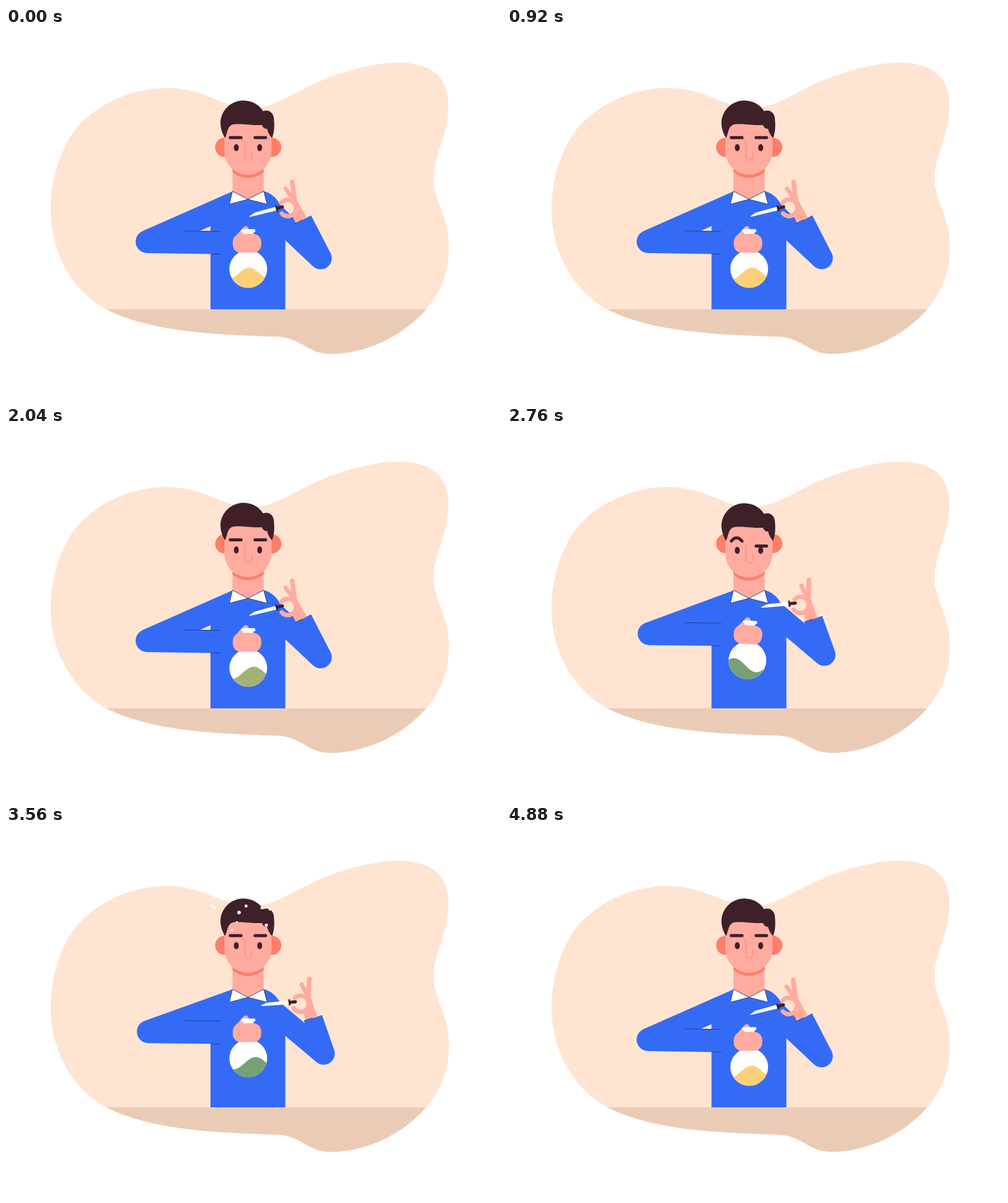
Animation of 800 by 600 pixels, one loop 4920 ms. Source, as an HTML page with a canvas:

```html
<!DOCTYPE html>
<html lang="en">
<head>
<meta charset="utf-8">
<title>Chemist with flask</title>
<style>
html, body { margin: 0; width: 100%; height: 100%; overflow: hidden; background: #fff; }
canvas { display: block; width: 800px; height: 600px; }
</style>
</head>
<body>
<canvas id="stage" width="800" height="600"></canvas>
<script>
const ctx = document.getElementById('stage').getContext('2d');
const LOOP = 4920;
const PEACH = '#ffe4d2', TABLE = '#eaccb6', BLUE = '#346bf6', SEAM = '#1d3d96';
const SKIN = '#ffaba0', BLUSH = '#ff7e69', DARK = '#3f2028', WHITE = '#fff';
const YELLOW = [252, 208, 120], GREEN = [120, 160, 117];

const blob = new Path2D('M72 294C72 250 85 205 107 171C139 126 200 97 260 97C322 97 352 130 394 130C435 130 472 100 512 84C550 69 596 56 634 56C684 56 715 76 715 125C715 175 691 205 691 243C691 280 716 305 716 355C716 396 701 430 679 455C640 500 580 527 525 527C485 527 478 499 434 499C340 496 235 492 162 455C105 424 72 360 72 294Z');
const torso = new Path2D('M330.5 455V292L366 264H417C426 266 436 273 442 284L451.5 300V455Z');
const neck = new Path2D('M366 222H416.5V264L391 277L366 264Z');
const face = new Path2D('M353 156H429V199.5A38 38 0 0 1 353 199.5Z');
const hair = new Path2D('M354 178C349 170 346.5 161 346.5 152A37.5 37.5 0 0 1 415.5 134.5C425 130.5 433 138 433 147C434 158 434 168 430 178C426 174 423 168 422 163C418 163 415 161 414 157C397 157.5 385 155 372 155.5C357 155 359 168 354 178Z');
const nose = new Path2D('M380.5 180C386 182 386 187 386 193V207.5C386 216 397 216 397 207.5V201.5');
const collars = [new Path2D('M366 264L391 277L361 285Z'), new Path2D('M416.5 264L391 277L422 285Z')];
const palm = new Path2D('M470 278L486 307L468.5 316L462 302Q469 297 468 284Z');

// Time of each key and the position of the wave crest, drifting left.
const WAVE_LENGTH = 72;
const crestKeys = [[0, 1.5], [920, -67], [2040, -135], [2760, -165], [3560, -204], [4240, -244], [4880, -284], [LOOP, -286.5]];

// Resting x, y and size of the specks thrown from the flask.
const specks = [[332, 128, 4], [337, 131, 4.3], [376.5, 138.5, 5], [388, 128, 4.2], [373, 154, 2.6],
  [365, 167, 3.4], [421, 159, 4.4], [414, 131, 4.2], [427, 133, 4]];

const lerp = (a, b, p) => a + (b - a) * p;
const ramp = (t, from, to) => Math.min(1, Math.max(0, (t - from) / (to - from)));
const ease = (t, from, to) => { const p = ramp(t, from, to); return p * p * (3 - 2 * p); };
const pulse = (t, from, to) => Math.sin(Math.PI * ramp(t, from, to)) ** 2;

function keyed(keys, t) {
  const i = keys.findIndex(k => t < k[0]);
  const [t0, a] = keys[i - 1], [t1, b] = keys[i];
  return lerp(a, b, (t - t0) / (t1 - t0));
}

function fill(color, path) { ctx.fillStyle = color; ctx.fill(path); }

function poly(color, points) {
  ctx.beginPath();
  points.forEach(([x, y]) => ctx.lineTo(x, y));
  ctx.closePath();
  ctx.fillStyle = color;
  ctx.fill();
}

function disc(color, x, y, rx, ry = rx) {
  ctx.beginPath();
  ctx.ellipse(x, y, rx, ry, 0, 0, Math.PI * 2);
  ctx.fillStyle = color;
  ctx.fill();
}

function pill(color, x, y, w, h, r) {
  ctx.beginPath();
  ctx.roundRect(x, y, w, h, r);
  ctx.fillStyle = color;
  ctx.fill();
}

function line(color, width, x1, y1, x2, y2, cap = 'round') {
  ctx.beginPath();
  ctx.moveTo(x1, y1);
  ctx.lineTo(x2, y2);
  ctx.strokeStyle = color;
  ctx.lineWidth = width;
  ctx.lineCap = cap;
  ctx.stroke();
}

function layer(draw) { ctx.save(); draw(); ctx.restore(); }

function drawBackground() {
  fill(WHITE, new Path2D('M0 0H800V600H0Z'));
  fill(PEACH, blob);
  layer(() => {
    ctx.clip(blob);
    ctx.fillStyle = TABLE;
    ctx.fillRect(0, 455, 800, 145);
  });
}

function drawHead(t) {
  const nod = ease(t, 1100, 2300) - ease(t, 2900, 3400);
  const frown = ease(t, 2420, 2680) - ease(t, 2900, 3100);
  const open = 1 - 0.9 * pulse(t, 200, 400);
  const dy = 6 * nod;

  for (const x of [353.5, 429.5]) disc(BLUSH, x, 193 - 4.5 * nod, 15.5);
  fill(SKIN, neck);
  layer(() => {
    ctx.clip(neck);
    ctx.translate(0, dy + 5);
    fill(BLUSH, face);
  });
  layer(() => {
    ctx.translate(0, dy);
    fill(SKIN, face);
    fill(DARK, hair);
    ctx.strokeStyle = BLUSH;
    ctx.lineWidth = 1;
    ctx.lineCap = 'round';
    ctx.stroke(nose);
    for (const x of [372.2, 410]) disc(DARK, x, 193.5, 4, 5.8 * open);

    const y = 177.2;
    // The lowered brow also hides the top of its eye.
    if (frown > 0) {
      ctx.fillStyle = SKIN;
      ctx.fillRect(404, 183, 12, 6 * frown);
    }
    line(DARK, 5, 402.5, y + 9.3 * frown, 419.5, y + 9.3 * frown);
    ctx.beginPath();
    ctx.moveTo(362.5, y + 1.3 * frown);
    ctx.quadraticCurveTo(371, y - 9.2 * frown, 379.8, y + 1.3 * frown);
    ctx.lineWidth = 5;
    ctx.stroke();
  });
}

function drawCollar() {
  ctx.strokeStyle = '#27304f';
  ctx.lineWidth = 0.8;
  for (const c of collars) { fill(WHITE, c); ctx.stroke(c); }
}

function drawLeftSleeve(lift, sway) {
  const ex = lerp(228, 230, lift), ey = lerp(345.5, 332.7, lift);
  const wy = lerp(347.3, 333.8, lift) + sway;
  line(BLUE, 37, ex, ey, 374, 281, 'butt');
  line(BLUE, 37, ex, ey, 346, wy, 'butt');
  disc(BLUE, ex, ey, 18.5);
  const topAt = x => lerp(ey, wy, (x - ex) / (346 - ex)) - 18.3;
  line(SEAM, 1, 287.5, topAt(287.5), 346, topAt(346), 'butt');
  line(SEAM, 1, 331, wy + 18.2, 346, wy + 18.5, 'butt');
}

function drawLiquid(t) {
  const p = ramp(t, 1100, 2500) - ramp(t, 3900, 4560);
  const color = `rgb(${YELLOW.map((c, i) => Math.round(lerp(c, GREEN[i], p)))})`;
  const crest = keyed(crestKeys, t);
  const points = [[32, 32], [-32, 32]];
  for (let x = -32; x <= 32; x++) {
    points.push([x, 8 - 10 * Math.cos(2 * Math.PI * (x - crest) / WAVE_LENGTH)]);
  }
  layer(() => {
    ctx.translate(391.5, 389.7);
    ctx.beginPath();
    ctx.arc(0, 0, 30.5, 0, Math.PI * 2);
    ctx.clip();
    poly(color, points);
  });
}

function drawFlask(t, lift, sway) {
  const shake = 4 * Math.sin(2 * Math.PI * ramp(t, 2660, 3260) * 1.5);
  layer(() => {
    ctx.translate(390, 348 - 14 * lift + sway);
    ctx.rotate(shake * Math.PI / 180);
    ctx.translate(-390, -348);
    line(SKIN, 9, 374, 340, 387.5, 325);
    pill(WHITE, 380, 325.3, 23, 5.2, 2.5);
    pill(WHITE, 383, 329, 17, 8, 0);
    disc(WHITE, 391.5, 389.7, 30.5);
    drawLiquid(t);
    pill(SKIN, 366.5, 333, 46, 30.5, 13);
  });
}

function drawRightHand() {
  fill(SKIN, palm);
  line(SKIN, 7.5, 462.5, 249, 467, 282);
  line(SKIN, 7, 452, 260, 463, 275);
  ctx.beginPath();
  ctx.arc(455.5, 291, 13.3, -2.5, 2.4);
  ctx.lineWidth = 7;
  ctx.stroke();
  line(SEAM, 1, 466, 317, 479, 310.3, 'butt');

  ctx.translate(437, 292);
  ctx.rotate(-15.5 * Math.PI / 180);
  poly(WHITE, [[-46, 0.5], [-36, -3], [0, -3], [0, 3], [-36, 2], [-45, 1.5]]);
  pill(DARK, -1, -5, 3, 10, 1);
  pill(DARK, 1, -2.5, 11.5, 5, 2);
}

function drawRightArm(t) {
  const reach = ease(t, 2300, 2860) - ease(t, 4320, 4890) + 0.08 * pulse(t, 0, 1120);
  const ex = lerp(508.5, 513.3, reach), ey = lerp(372.3, 368, reach);
  const hx = lerp(455.5, 476, reach), hy = lerp(291, 287.5, reach);
  const turn = reach * 10 * Math.PI / 180;
  const cos = Math.cos(turn), sin = Math.sin(turn);
  const place = (x, y) => [hx + x * cos - y * sin, hy + x * sin + y * cos];
  const [lx, ly] = place(10.5, 26), [rx, ry] = place(37.5, 12);
  const dx = ex - (lx + rx) / 2, dy = ey - (ly + ry) / 2, k = 18 / Math.hypot(dx, dy);

  line(BLUE, 36, 423, 292, ex, ey, 'butt');
  disc(BLUE, ex, ey, 18);
  poly(BLUE, [[lx, ly], [rx, ry], [ex + dy * k, ey - dx * k], [ex - dy * k, ey + dx * k]]);
  layer(() => {
    ctx.translate(hx, hy);
    ctx.rotate(turn);
    ctx.translate(-455.5, -291);
    drawRightHand();
  });
}

function drawSpecks(t) {
  const p = ramp(t, 2960, 3710);
  if (p === 0 || p === 1) return;
  const travel = 1 - (1 - p) ** 3;
  for (const [x, y, r] of specks) {
    disc(WHITE, lerp(392, x, travel), lerp(312, y, travel), r * Math.sin(Math.PI * p));
  }
}

function draw(t) {
  const lift = ease(t, 2300, 2890) - ease(t, 3790, 4240);
  const sway = 0.8 * pulse(t, 950, 2050);
  drawBackground();
  fill(BLUE, torso);
  drawLeftSleeve(lift, sway);
  drawRightArm(t);
  drawHead(t);
  drawCollar();
  drawFlask(t, lift, sway);
  drawSpecks(t);
}

const start = performance.now();
function tick() {
  draw((performance.now() - start) % LOOP);
  requestAnimationFrame(tick);
}
tick();
</script>
</body>
</html>
```
